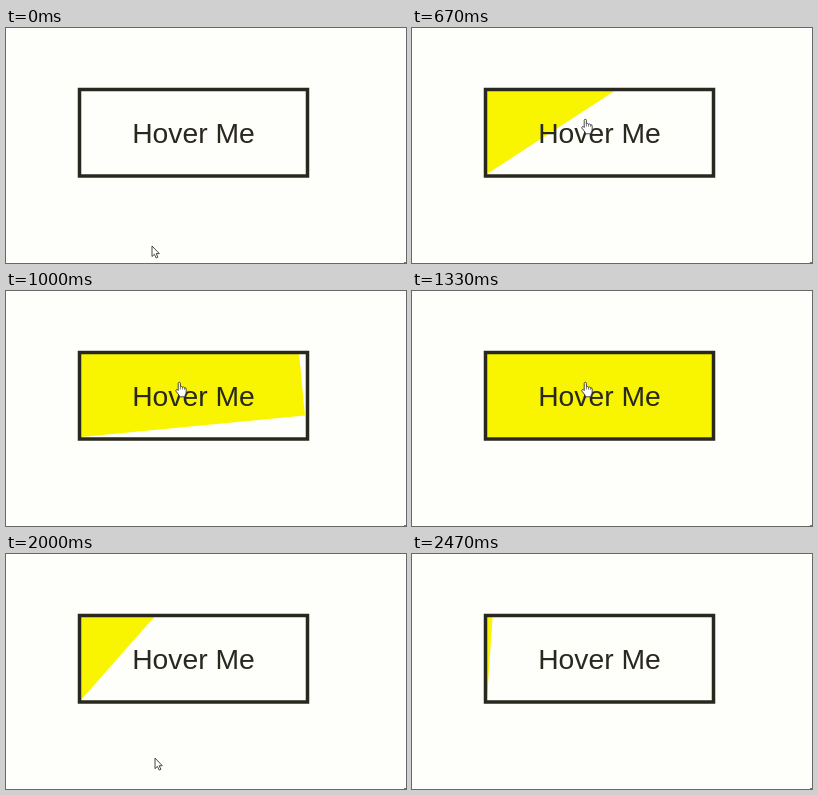
An HTML page that plays this animation: 400 by 235 pixels, repeating every 2.54 s.

```html
<!DOCTYPE html>
<html lang="en">
<head>
<meta charset="utf-8">
<title>Hover button</title>
<style>
  html, body { margin: 0; width: 100%; height: 100%; overflow: hidden; background: #fefefa; }
  svg { display: block; width: 100%; height: 100%; }
  text { font: 28.3px "Liberation Sans", Arial, sans-serif; fill: #28281e; }
  .cursor { fill: #fff; stroke: #333; stroke-width: .9; stroke-linejoin: round; }
</style>
</head>
<body>
<svg viewBox="0 0 400 235">
  <clipPath id="inside"><rect x="75" y="63" width="225" height="83"/></clipPath>
  <g clip-path="url(#inside)">
    <rect id="panel" x="75" y="63" width="225" height="83" fill="#f9f400"/>
  </g>
  <rect x="73.5" y="61.5" width="228" height="86.5" fill="none" stroke="#28281e" stroke-width="3.5"/>
  <text x="187.5" y="115" text-anchor="middle">Hover Me</text>
  <rect x="398" y="234" width="2" height="1" fill="#777"/>
  <path id="arrow" class="cursor" d="M0 0V10.5L2.4 8.3 4.2 12 5.9 11.2 4.2 7.6H7.3Z"/>
  <g id="hand" class="cursor">
    <path d="M-1.3 8.5V1.4Q-1.3 .3-.2 .3T.9 1.4V4.8Q2 4 3 5.2 4.2 4.5 5 5.7 6.7 5.4 6.7 7.2V10Q6.6 12 5.6 13V14.8H-.2V13.5L-3.4 9.3Q-4.1 8-3 7.5-2.1 7.3-1.3 8.5Z"/>
    <path d="M.9 4.8V7.6M3 5.2V7.6M5 5.7V7.8" fill="none" stroke-width=".6"/>
  </g>
</svg>
<script>
  const LOOP = 2540, STEPS = 38;
  const BUTTON_BOTTOM = 149;
  const REST = { x: 146, y: 218 }, HOVER = { x: 173.5, y: 91 };

  const $ = id => document.getElementById(id);
  const panel = $("panel"), arrow = $("arrow"), hand = $("hand");

  const span = (t, start, length) => Math.min(1, Math.max(0, (t - start) / length));
  const mix = (a, b, f) => a + (b - a) * f;
  const sineInOut = u => (1 - Math.cos(Math.PI * u)) / 2;
  const cubicOut = u => 1 - (1 - u) ** 3;

  // CSS "ease": cubic-bezier(.25, .1, .25, 1)
  function ease(x) {
    let lo = 0, hi = 1;
    for (let i = 0; i < 24; i++) {
      const s = (lo + hi) / 2;
      if (.75 * s * (1 - s) + s ** 3 < x) lo = s; else hi = s;
    }
    const s = (lo + hi) / 2, r = 1 - s;
    return .3 * r * r * s + 3 * r * s * s + s ** 3;
  }

  // Fifteen steps a second, rounded to 10 ms
  function snap(t) {
    const step = Math.min(STEPS - 1, Math.floor((Math.floor(t / 10) * 3 + 1) / 20));
    return Math.round(step * 20 / 3) * 10;
  }

  function draw(now) {
    const t = snap(now % LOOP);

    const open = ease(span(t, 303, 1000)) - ease(span(t, 1655, 1100));
    panel.setAttribute("transform", `rotate(${-90 * (1 - open)} 75 146)`);

    const near = sineInOut(span(t, 0, 640)) - cubicOut(span(t, 1400, 1150));
    const x = mix(REST.x, HOVER.x, near), y = mix(REST.y, HOVER.y, near);
    const over = y < BUTTON_BOTTOM;
    for (const el of [arrow, hand]) el.setAttribute("transform", `translate(${x} ${y})`);
    hand.style.display = over ? "" : "none";
    arrow.style.display = over || t >= 2470 ? "none" : "";
  }

  let start;
  function tick(now) {
    start ??= now;
    draw(now - start);
    requestAnimationFrame(tick);
  }
  draw(0);
  requestAnimationFrame(tick);
</script>
</body>
</html>
```
